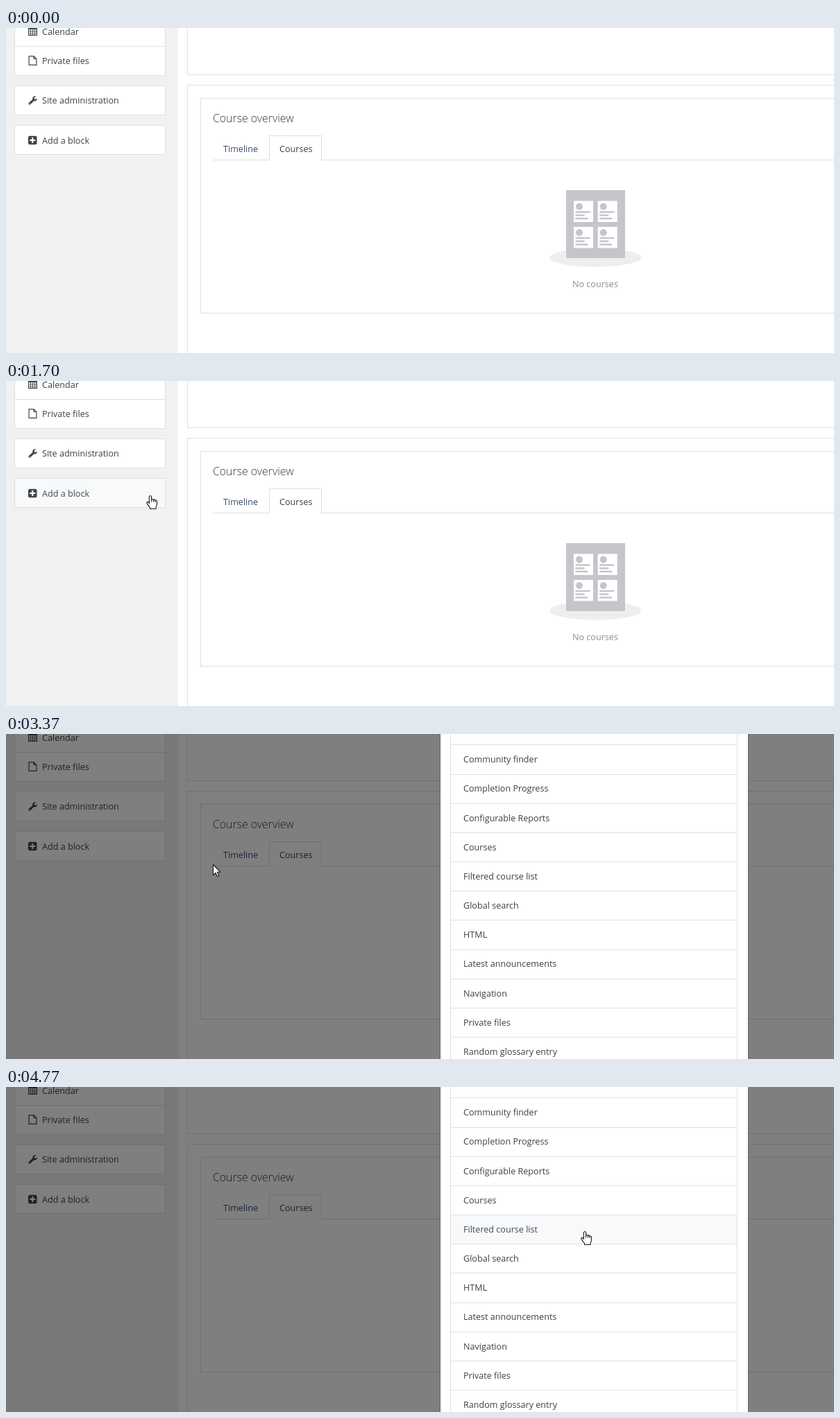
Write an HTML page with a canvas that moves like this. It is 1193x469 px and loops after 5.88 s.

```html
<!DOCTYPE html>
<html lang="en">
<head>
<meta charset="utf-8">
<title>Add a block</title>
<style>
  html, body { margin: 0; width: 100%; height: 100%; overflow: hidden; background: #fff; }
  canvas { display: block; width: 1193px; height: 469px; }
</style>
</head>
<body>
<canvas id="stage" width="1193" height="469"></canvas>
<script>
const W = 1193, H = 469, LOOP = 5880, MODAL_AT = 2570;
const ctx = document.getElementById('stage').getContext('2d');
const FONT = '"Open Sans", "Noto Sans", sans-serif';
const INK = '#3b4147', HOVER_INK = '#434a50', ICON = '#3c4551', LINE = '#dedfe0', GREY = '#c4c6cc';
const ROWS = ['Community finder', 'Completion Progress', 'Configurable Reports', 'Courses',
  'Filtered course list', 'Global search', 'HTML', 'Latest announcements', 'Navigation',
  'Private files', 'Random glossary entry'];
const ROW_H = 42.15, HOVER_ROW = 4;

// Pointer moves: start, end, steps, from, bend, to
const MOVES = [
  [810, 1360, 10, [530, 438], [408, 311], [287, 184]],
  [1460, 2000, 10, [287, 184], [216, 154], [145, 170]],
  [2060, 2180, 3, [145, 170], [139, 171], [133, 172]],
  [3070, 3630, 10, [133, 172], [280, 186], [428, 202]],
  [3680, 4200, 9, [428, 202], [533, 201], [638, 216]],
  [4270, 4770, 9, [638, 216], [735, 224], [833, 208]]
];

const ease = p => (p * p * (3 - 2 * p) + 1 - Math.pow(1 - p, 1.4)) / 2;
const bezier = (a, b, c, s) => (1 - s) * (1 - s) * a + 2 * s * (1 - s) * b + s * s * c;

function pointerAt(t) {
  if (t < MOVES[0][0]) return null;
  const i = MOVES.findLastIndex(m => t >= m[0]);
  const [t0, t1, n, a, b, c] = MOVES[i];
  const k = Math.min(n - 1, Math.floor((t - t0) / (t1 - t0) * (n - 1) + 0.001));
  const s = ease(i ? (k + 1) / n : k / (n - 1));
  return { x: bezier(a[0], b[0], c[0], s), y: bezier(a[1], b[1], c[1], s) };
}

function fill(color, x, y, w, h) {
  ctx.fillStyle = color;
  ctx.fillRect(x, y, w, h);
}

function box(x, y, w, h, bg = '#fff', line = LINE) {
  fill(bg, x, y, w, h);
  ctx.strokeStyle = line;
  ctx.lineWidth = 1;
  ctx.strokeRect(x + 0.5, y + 0.5, w - 1, h - 1);
}

function text(str, x, y, color = INK, size = 12.6, weight = 400) {
  ctx.font = `${weight} ${size}px ${FONT}`;
  ctx.fillStyle = color;
  ctx.fillText(str, x, y);
}

function disc(color, x, y, rx, ry = rx) {
  ctx.fillStyle = color;
  ctx.beginPath();
  ctx.ellipse(x, y, rx, ry, 0, 0, Math.PI * 2);
  ctx.fill();
}

function at(x, y, draw) {
  ctx.save();
  ctx.translate(x, y);
  draw();
  ctx.restore();
}

function calendarIcon() {
  fill(ICON, 0, 0, 13, 13);
  for (let r = 0; r < 3; r++)
    for (let c = 0; c < 4; c++) fill('#fff', 1 + c * 2.9, 4 + r * 2.8, 2.1, 2);
}

const filePath = new Path2D('M.6.6H7.5L11.4 4.5V13.4H.6ZM7.5.6V4.5H11.4');
function fileIcon() {
  ctx.strokeStyle = ICON;
  ctx.lineWidth = 1.2;
  ctx.stroke(filePath);
}

const wrenchPath = new Path2D('M.6 10.2L6.2 4.9Q5.8 2 7.8.7Q9.6-.3 11.5.5L8.8 2.5V4.2L10.3 5L12.8 3.4Q13.2 5.3 11.6 6.7Q10 7.8 8.3 7.2L2.9 12.5Q1.8 13.3.7 12.3Q-.3 11.2.6 10.2Z');
function wrenchIcon() {
  ctx.fillStyle = ICON;
  ctx.fill(wrenchPath);
  disc('#fff', 1.9, 11.2, 0.6);
}

function plusIcon() {
  ctx.fillStyle = ICON;
  ctx.beginPath();
  ctx.roundRect(0, 0, 12.5, 12.5, 2.2);
  ctx.fill();
  fill('#fff', 5.2, 2.2, 2.1, 8.1);
  fill('#fff', 2.2, 5.2, 8.1, 2.1);
}

function sidebar(hover) {
  fill('#f1f1f1', 0, 0, 248, H);
  box(12, -20, 218, 47);
  box(12, 26, 218, 43);
  box(12, 83, 218, 43);
  box(12, 140, 218, 43, hover ? '#f8f9fa' : '#fff');
  at(32, -2, calendarIcon);
  at(32.5, 40, fileIcon);
  at(32, 98, wrenchIcon);
  at(32, 155.7, plusIcon);
  text('Calendar', 52, 10);
  text('Private files', 52, 52);
  text('Site administration', 52, 109);
  text('Add a block', 52, 167, hover ? HOVER_INK : INK);
}

function courseCard(x, y) {
  fill('#fff', x, y, 28, 30.5);
  disc(GREY, x + 8, y + 8.2, 5);
  [21, 13, 18].forEach((w, i) => fill(GREY, x + 2.5, y + 14.8 + i * 4.7, w, 2.5));
}

function overview() {
  box(261, -10, 960, 78);
  box(261, 82, 960, 420);
  box(280, 101, 940, 311);
  text('Course overview', 298, 136, '#32383d', 15.85, 300);
  fill(LINE, 298, 190, W, 1);
  box(379, 155, 76, 40);
  fill('#fff', 379, 191, 76, 5);
  fill('#fff', 380, 189, 74, 3);
  text('Timeline', 313, 178.5, '#34496f');
  text('Courses', 394, 178.5);

  disc('#eeeeee', 849.3, 331.3, 66, 13.5);
  fill(GREY, 807, 234, 85, 98);
  for (const x of [818, 852.7])
    for (const y of [249.5, 287]) courseCard(x, y);
  text('No courses', 816, 374, '#868e93');
}

function modal(hover) {
  fill('rgba(0,0,0,.5)', 0, 0, W, H);
  fill('rgba(0,0,0,.2)', 625, 0, 445, H);
  fill('#fff', 626, 0, 443, H);
  if (hover) fill('#f8f9fa', 641, 184, 413, 43);
  fill(LINE, 640, 0, 1, H);
  fill(LINE, 1053, 0, 1, H);
  ROWS.forEach((name, i) => {
    fill(LINE, 640, Math.round(15.5 + i * ROW_H) - (i ? 0 : 1), 414, 1);
    text(name, 659, Math.round(41.3 + i * ROW_H), hover && i === HOVER_ROW ? HOVER_INK : INK);
  });
}

const arrowPath = new Path2D('M.5.5V15.5L4 12.3L6.4 17.5L8.8 16.5L6.4 11.3H10.9Z');
const handPath = new Path2D('M-.6 1.8Q1-.7 2.6 1.8V6Q4.2 4.9 5.4 6.4Q7 5.6 8 7.2Q10.3 6.8 10.5 9V13Q10.1 15.5 9 17V19.5H.5V17.5Q-2 14.7-3.9 11.6Q-4.7 9.2-2.6 9.3L-.6 11.4Z');
const fingers = new Path2D('M2.6 6V9.5M5.4 6.4V9.5M8 7.2V10');

function pointer(p, hand) {
  at(Math.round(p.x), Math.round(p.y), () => {
    const path = hand ? handPath : arrowPath;
    ctx.lineJoin = 'round';
    ctx.lineWidth = 1.1;
    ctx.strokeStyle = '#15151f';
    ctx.fillStyle = '#fff';
    ctx.fill(path);
    ctx.stroke(path);
    if (hand) ctx.stroke(fingers);
  });
}

function render(t) {
  const open = t >= MODAL_AT;
  const p = pointerAt(t);
  const onButton = !open && !!p && p.x < 230 && p.y > 140 && p.y < 183;
  const onRow = open && !!p && p.x > 641;
  fill('#fff', 0, 0, W, H);
  sidebar(onButton);
  overview();
  if (open) modal(onRow);
  if (p) pointer(p, onButton || onRow);
}

const start = performance.now();
function tick() {
  render((performance.now() - start) % LOOP);
  requestAnimationFrame(tick);
}
tick();
</script>
</body>
</html>
```
